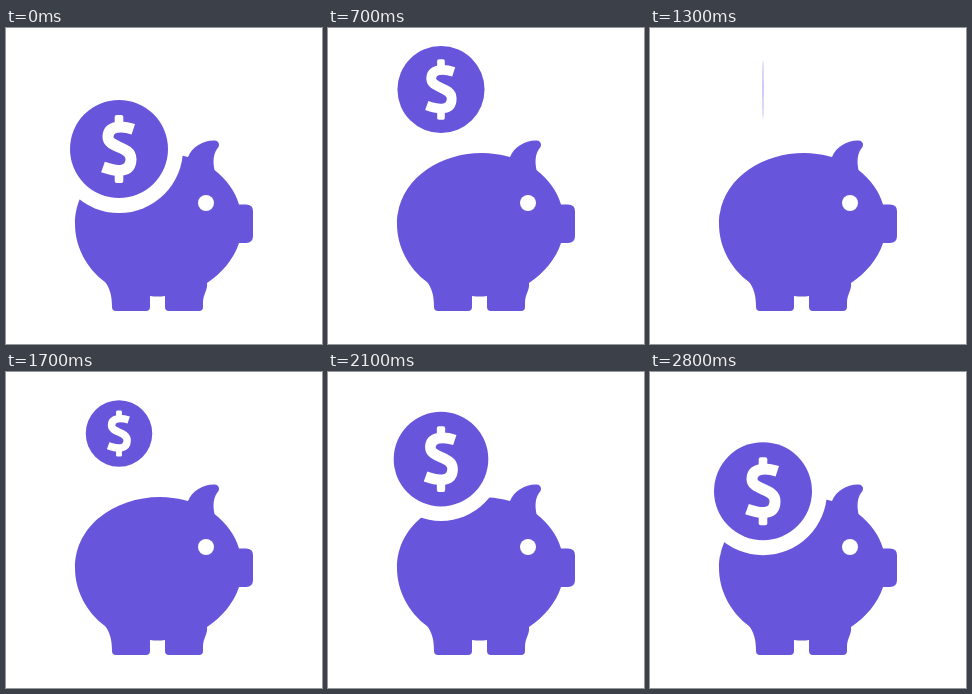
Write an HTML page that moves like this. It is 316 by 316 pixels and loops after 2900 ms.

```html
<!DOCTYPE html>
<html lang="en">
<head>
<meta charset="utf-8">
<title>Piggy bank</title>
<style>
  html, body { margin: 0; width: 100%; height: 100%; overflow: hidden; background: #fff; }
  svg { display: block; width: 100%; height: 100%; }
</style>
</head>
<body>
<svg viewBox="0 0 316 316" fill="#6755dc">
  <path d="M154 125 Q170 125.500 182 129 C186 119 197 112 209 112.500 Q213 113 213 117 Q213 119 211 121
    C207 127 207 134 208.500 142 C221 152 229 163 233 176.500 H240 Q247 176.500 247 183 V208 Q247 215 240 215 H233
    C228 231 215 246 201 255 C202 262 197 266 197 275 V279 Q197 283 193 283 H163 Q159 283 159 279 V268
    Q152 269 144 268 V279 Q144 283 140 283 H110 Q106 283 106 279 C106 268 104 260 99 254
    C80 240 69 218 69 196 C69 152 111 125 154 125Z"/>
  <circle cx="200" cy="175" r="8" fill="#fff"/>
  <g id="coin">
    <circle r="64" fill="#fff"/>
    <circle r="49"/>
    <g fill="#fff">
      <path d="M14.300 -19.800 C3 -23.500 -11 -23.500 -11 -12 C-11 -1 12 -3 12 10 C12 24 -2 23 -16 18"
        fill="none" stroke="#fff" stroke-width="11"/>
      <rect x="-4.300" y="-34" width="8.600" height="13" rx="2"/>
      <rect x="-4.300" y="21" width="8.600" height="13" rx="2"/>
    </g>
  </g>
</svg>
<script>
const LOOP = 2900, STEP = 100;
const TOP = 61.5, BOTTOM = 121, REST = 119.5, SMALL = 0.6;
const coin = document.getElementById("coin");

const mix = (a, b, u) => a + (b - a) * u;
const progress = (t, start, end) => Math.min(1, Math.max(0, (t - start) / (end - start)));
const easeOut = u => 1 - (1 - u) ** 1.6;
// Soft start, then a long approach to 1
const settle = (t, start, tau, power) => 1 - Math.exp(-((Math.max(0, t - start) / tau) ** power));

function draw(now) {
  const t = Math.floor(((now + 5) % LOOP) / STEP) * STEP;

  // Rise, hover, drop
  const y = t < 1800
    ? mix(BOTTOM, TOP, easeOut(progress(t, 0, 600)))
    : mix(TOP, REST, settle(t, 1800, 405, 1.8));

  // Shrink, turn edge-on and back, grow
  const scale = t < 1600
    ? mix(1, SMALL, progress(t, 600, 960))
    : mix(SMALL, 1, settle(t, 1600, 275, 1.5));
  const turn = Math.abs(Math.cos(Math.PI * progress(t, 1000, 1600)));

  coin.setAttribute("transform",
    `translate(113 ${y}) scale(${Math.max(0.006, scale * turn)} ${scale})`);
  requestAnimationFrame(draw);
}
requestAnimationFrame(draw);
</script>
</body>
</html>
```
